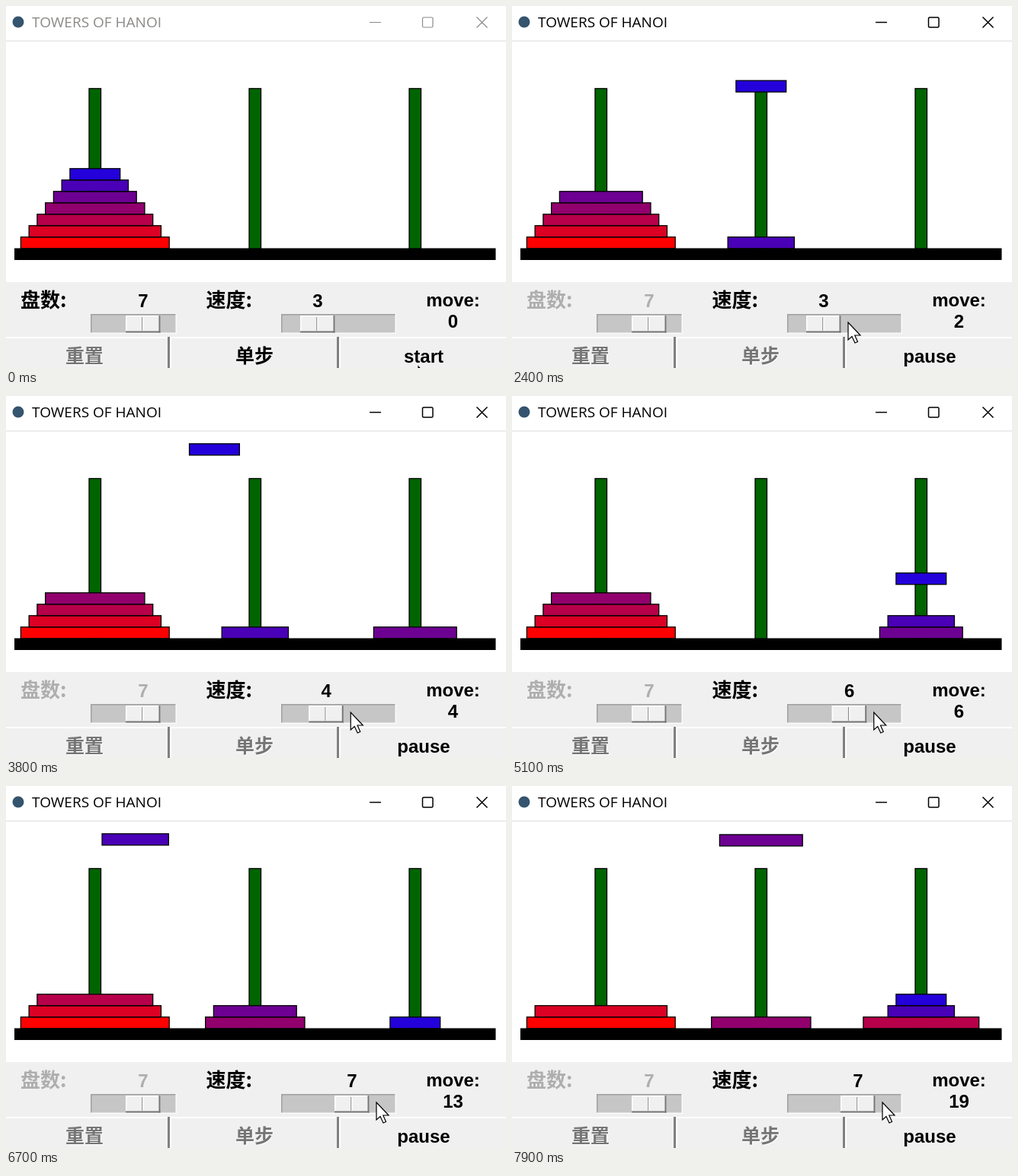
These frames come from a looping animation (656 by 476 pixels, 8000 ms). An HTML page with a canvas:

```html
<!DOCTYPE html>
<html lang="zh">
<head>
<meta charset="utf-8">
<title>Towers of Hanoi</title>
<style>
  html, body { margin: 0; width: 100%; height: 100%; overflow: hidden; background: #fff; }
  canvas { display: block; }
</style>
</head>
<body>
<canvas id="stage" width="656" height="476"></canvas>
<script>
const ctx = document.getElementById('stage').getContext('2d');
const LOOP = 8000, TICK = 100;
const DISCS = 7, THICK = 15, FLOOR = 319, TRAVEL_Y = 63;
const BOLD_FONT = 'bold 24px "Liberation Sans", Arial, sans-serif';
const cjkFont = size => `bold ${size}px "Noto Sans CJK SC", "Noto Sans CJK", sans-serif`;

const ACTIVATE = 500, PRESS = 600, START = 700, DEPART = 717;
const FIRST_SPEED = 3, FIRST_RATE = 1.138, RATE_GROWTH = 1.3257; // rate in pixels per ms
// Each drag of the speed slider, [grab, release], halts the discs and adds one to the speed.
const DRAGS = [[2625, 3100], [3800, 3950], [4400, 4766], [5300, 5553]];

const clamp01 = v => Math.min(1, Math.max(0, v));
const progress = (t, from, to) => clamp01((t - from) / (to - from));
const mix = (a, b, k) => a + (b - a) * k;

const speedAt = t => DRAGS.reduce((speed, [grab, release]) => speed + progress(t, grab, release), FIRST_SPEED);
const thumbX = speed => 408 + 11.25 * (speed - FIRST_SPEED);

function travelled(t) {
  let total = 0, from = DEPART, rate = FIRST_RATE;
  for (const [grab, release] of [...DRAGS, [LOOP, LOOP]]) {
    total += rate * Math.max(0, Math.min(t, grab) - from);
    from = release;
    rate *= RATE_GROWTH;
  }
  return total;
}

function pointerAt(t) {
  const enter = progress(t, 0, 300), glide = progress(t, 2200, 2400);
  return [
    mix(mix(541, 553, enter), thumbX(speedAt(t)) + 33, glide),
    mix(mix(474, 460, enter), 416, glide)
  ];
}

const pegX = peg => 116.8 + 210 * peg;
const stackY = height => FLOOR - THICK * (height + 1);

// Plays whole moves until the travelled distance is used up.
function solve(distance) {
  const pegs = [[], [], []];
  for (let disc = DISCS; disc > 0; disc--) pegs[0].push(disc);
  for (let moves = 0; ; moves++) {
    const disc = 32 - Math.clz32((moves + 1) & -(moves + 1));
    const from = pegs.findIndex(peg => peg.includes(disc));
    const to = (from + (disc % 2 ? 2 : 1)) % 3;
    const startY = stackY(pegs[from].length - 1), endY = stackY(pegs[to].length);
    const rise = startY - TRAVEL_Y, slide = 210 * Math.abs(to - from), fall = endY - TRAVEL_Y;
    pegs[from].pop();
    if (distance < rise + slide + fall) {
      const x = mix(pegX(from), pegX(to), clamp01((distance - rise) / slide));
      const y = distance < rise ? startY - distance : TRAVEL_Y + Math.max(0, distance - rise - slide);
      return { pegs, moves, flying: { disc, x, y } };
    }
    distance -= rise + slide + fall;
    pegs[to].push(disc);
  }
}

function fill(color, x, y, w, h) {
  ctx.fillStyle = color;
  ctx.fillRect(x, y, w, h);
}

function outlined(color, x, y, w, h) {
  fill(color, x, y, w, h);
  ctx.strokeStyle = '#000';
  ctx.lineWidth = 1.3;
  ctx.strokeRect(x, y, w, h);
}

function text(str, x, y, color = '#000', font = BOLD_FONT, align = 'center') {
  ctx.font = font;
  ctx.textAlign = align;
  ctx.fillStyle = color;
  ctx.fillText(str, x, y);
}

function drawTitleBar(active) {
  const color = active ? '#000' : '#8c8a87';
  fill('#ececec', 0, 45, 656, 2);
  ctx.fillStyle = '#35546e';
  ctx.beginPath();
  ctx.arc(16, 21, 7.5, 0, 7);
  ctx.fill();
  text('TOWERS OF HANOI', 34, 28, color, '19px "Open Sans", "Noto Sans", sans-serif', 'left');
  ctx.strokeStyle = color;
  ctx.lineWidth = active ? 1.5 : 1.2;
  ctx.beginPath();
  ctx.moveTo(477, 21.5); ctx.lineTo(492, 21.5);
  ctx.roundRect(546.5, 15, 13.5, 13, 1.5);
  ctx.moveTo(617.5, 14.5); ctx.lineTo(631.5, 28.5);
  ctx.moveTo(631.5, 14.5); ctx.lineTo(617.5, 28.5);
  ctx.stroke();
}

function drawDisc(disc, x, y) {
  const width = 44.3 + 21.5 * disc, red = Math.round(255 * disc / DISCS);
  outlined(`rgb(${red},0,${255 - red})`, x - width / 2, y - 0.2, width, THICK);
}

function drawTower({ pegs, flying }) {
  fill('#000', 11, FLOOR - 0.5, 631.5, 15.5);
  pegs.forEach((stack, peg) => {
    outlined('#006400', pegX(peg) - 7.8, 108.5, 15.5, 210.5);
    stack.forEach((disc, height) => drawDisc(disc, pegX(peg), stackY(height)));
  });
  drawDisc(flying.disc, flying.x, flying.y);
}

function bevel(x, y, w, h, light, dark, lightSize, darkSize) {
  fill(light, x, y, w, lightSize);
  fill(light, x, y, lightSize, h);
  fill(dark, x, y + h - darkSize, w, darkSize);
  fill(dark, x + w - darkSize, y, darkSize, h);
}

function drawSlider(x, width, thumb, value, color) {
  fill('#c6c6c6', x, 405, width, 26);
  bevel(x, 405, width, 26, '#a0a0a0', '#fbfbfb', 1.5, 1.5);
  fill('#f0f0f0', thumb - 22, 407, 45.5, 22.5);
  bevel(thumb - 22, 407, 45.5, 22.5, '#fff', '#757575', 1.5, 2);
  fill('#8a8a8a', thumb - 0.8, 409, 1.2, 18);
  fill('#fff', thumb + 0.4, 409, 1.2, 18);
  text(value, thumb + 0.8, 396, color);
}

function drawButton(x, width, label, { font, disabled, pressed }) {
  const shift = pressed ? 1 : 0, center = x + width / 2 + shift;
  fill('#f0f0f0', x, 435, width, 45);
  if (pressed) bevel(x, 435, width, 45, '#696969', '#fff', 2, 2);
  else bevel(x, 435, width, 45, '#fff', '#808080', 2, 3);
  if (disabled) text(label, center + 1, 469.5, '#fff', font);
  text(label, center, 468.5 + shift, disabled ? '#757575' : '#000', font);
}

function drawPanel(t, moves) {
  const running = t >= START, faded = running ? '#aeaeae' : '#000';
  const speed = Math.floor(speedAt(t));
  fill('#f0f0f0', 0, 363, 656, 113);
  text('盘数:', 19, 396, faded, cjkFont(26), 'left');
  drawSlider(111, 113, 179, 7, faded);
  text('速度:', 262.5, 396, '#000', cjkFont(26), 'left');
  drawSlider(361, 151, thumbX(speed), speed, '#000');
  text('move:', 586.5, 395);
  text(moves, 586.5, 423);
  drawButton(-9, 224, '重置', { font: cjkFont(25), disabled: true });
  drawButton(215, 222, '单步', { font: cjkFont(25), disabled: running });
  drawButton(437, 222, running ? 'pause' : 'start', { font: BOLD_FONT, pressed: t >= PRESS && !running });
}

function drawPointer(x, y) {
  const shape = [[0, 0], [0, 23], [5, 18.5], [9, 27], [12.5, 25.5], [8.8, 17], [16, 17]];
  ctx.beginPath();
  shape.forEach(([dx, dy]) => ctx.lineTo(x + dx, y + dy));
  ctx.closePath();
  ctx.fillStyle = '#fff';
  ctx.fill();
  ctx.strokeStyle = '#000';
  ctx.lineWidth = 1.2;
  ctx.stroke();
}

function draw(now) {
  const t = Math.floor((now % LOOP) / TICK) * TICK;
  const state = solve(travelled(t));
  fill('#fff', 0, 0, 656, 476);
  drawTitleBar(t >= ACTIVATE);
  drawTower(state);
  drawPanel(t, state.moves);
  drawPointer(...pointerAt(t));
}

let begin;
function frame(now) {
  begin ??= now;
  draw(now - begin);
  requestAnimationFrame(frame);
}
requestAnimationFrame(frame);
</script>
</body>
</html>
```
